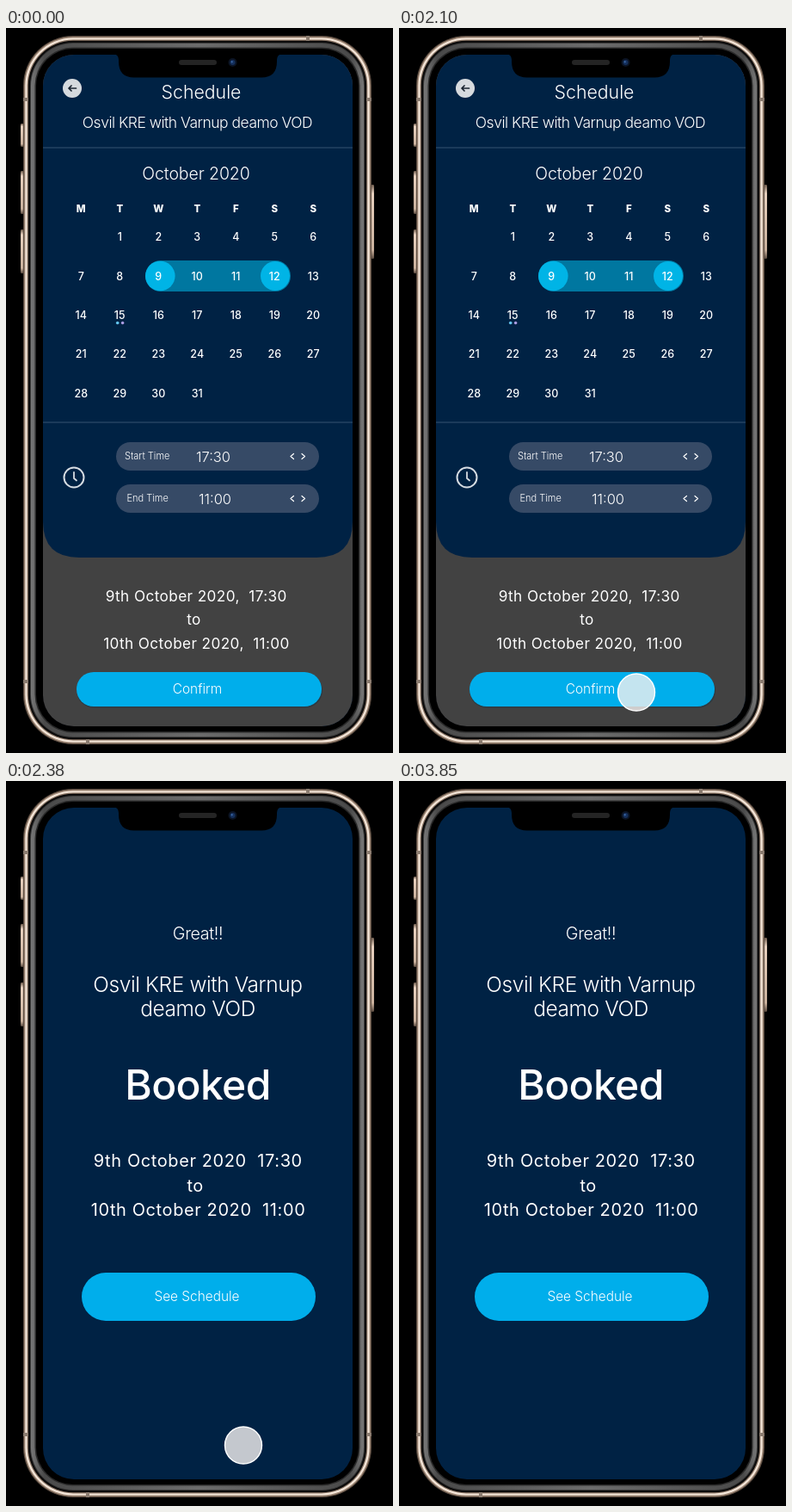
These frames come from a looping animation (450x842 px, 3990 ms). An HTML page:

```html
<!DOCTYPE html>
<html lang="en">
<head>
<meta charset="utf-8">
<title>Booking flow</title>
<style>
  html, body { margin: 0; width: 100%; height: 100%; overflow: hidden; background: #000; }
  svg { display: block; width: 100%; height: 100%; }
  text { font-family: Inter, "Liberation Sans", sans-serif; fill: #fff; white-space: pre; }
</style>
</head>
<body>
<svg id="stage" viewBox="0 0 450 842">
  <defs>
    <linearGradient id="steel">
      <stop offset="0" stop-color="#777"/>
      <stop offset=".04" stop-color="#4a4a4a"/>
      <stop offset=".5" stop-color="#6c6c6c"/>
      <stop offset=".96" stop-color="#4a4a4a"/>
      <stop offset="1" stop-color="#777"/>
    </linearGradient>
    <linearGradient id="key" x2="0" y2="1">
      <stop offset="0" stop-color="#6e5b4d"/>
      <stop offset=".12" stop-color="#e6cfbd"/>
      <stop offset=".88" stop-color="#c9b09c"/>
      <stop offset="1" stop-color="#57483d"/>
    </linearGradient>
    <clipPath id="glass"><rect x="43" y="31" width="360" height="780" rx="36"/></clipPath>
  </defs>
  <g id="body"></g>
  <g clip-path="url(#glass)">
    <g id="booked"></g>
    <rect id="dim" x="43" y="31" width="360" height="780" fill="#000018"/>
    <g id="schedule"></g>
  </g>
  <g id="notch"></g>
  <path id="arrow" d="M0 0V15L3.5 11.8 6 17.6 8.6 16.5 6.1 10.9H10.8Z" fill="#000" stroke="#fff" stroke-width="1.2"/>
  <circle id="touch" r="21.5" fill="rgb(246,242,241)" fill-opacity=".8" stroke="#fff" stroke-width="1.4"/>
</svg>
<script>
const $ = id => document.getElementById(id);
const NAVY = '#002244', BLUE = '#00aeeb';

const box = (x, y, w, h, r, fill) =>
  `<rect x="${x}" y="${y}" width="${w}" height="${h}" rx="${r}" fill="${fill}"/>`;
const disc = (x, y, r, fill) => `<circle cx="${x}" cy="${y}" r="${r}" fill="${fill}"/>`;
const line = (d, stroke, width) =>
  `<path d="${d}" fill="none" stroke="${stroke}" stroke-width="${width}" stroke-linecap="round" stroke-linejoin="round"/>`;
const label = (s, x, y, size, weight = 300, gap = 0, anchor = 'middle') =>
  `<text x="${x}" y="${y}" font-size="${size}" font-weight="${weight}" letter-spacing="${gap}" text-anchor="${anchor}">${s}</text>`;

function phoneBody() {
  const ring = (d, fill) => box(20 + d, 9 + d, 405 - 2 * d, 823 - 2 * d, 58 - d, fill);
  const keys = [[17, 111, 27], [17, 166, 50], [17, 234, 51], [424.5, 182, 86]]
    .map(([x, y, h]) => box(x, y, 3.5, h, 1.2, 'url(#key)')).join('');
  const rings = ring(0, '#594a3f') + ring(1.2, '#a48d7b') + ring(2.4, '#f5e7da') +
    ring(4.6, '#8d7868') + ring(5.8, '#0c0b0b') + ring(8, '#3a3a3a') +
    ring(9, 'url(#steel)') + ring(13.5, '#2a2a2a') + ring(15, '#000');
  const bands = [[20, 81, 6, 4], [419, 81, 6, 4], [20, 757, 6, 4], [419, 757, 6, 4],
    [349, 9, 4, 6], [93, 826, 4, 6]].map(b => box(...b, 0, '#8b7c70')).join('');
  return keys + rings + bands;
}

function notch() {
  return '<path d="M125 30Q131 31 131 37V39Q131 57.500 149 57.500H297Q315 57.500 315 39V37Q315 31 321 30Z"/>' +
    box(201, 37, 44, 6, 3, '#242424') +
    disc(263.5, 40, 5, '#0b1424') + disc(263.5, 40, 3, '#15305c') + disc(262.7, 39.3, 1.1, '#3f6ba8');
}

function calendar() {
  const col = i => 87.3 + 45 * i;
  let out = box(162, 270, 169, 36, 18, '#0077a0') + disc(179.3, 288, 17.3, '#00b4e6') + disc(313, 288, 17, '#00b4e6');
  [...'MTWTFSS'].forEach((d, i) => out += label(d, col(i), 213.5, 11.5, 800));
  for (let day = 1; day <= 31; day++) {
    out += label(day, col(day % 7), 247.3 + 45.3 * Math.floor(day / 7), 12.5, 500, .1);
  }
  return out + disc(129.7, 342.5, 1.8, '#62c4ee') + disc(135.6, 342.5, 1.8, '#a99be0');
}

function timeRow(y, name, nameX, time, timeX) {
  const m = y + 16.5;
  return box(128, y, 236, 33, 16.5, '#364a66') +
    label(name, nameX, m + 3.8, 11, 300, 0, 'start') +
    label(time, timeX, m + 6.6, 16.5, 300, 0, 'start') +
    line(`M334.500 ${m - 3}l-3.500 3 3.500 3M344 ${m - 3}l3.500 3-3.500 3`, '#fff', 1.2);
}

function scheduleScreen() {
  const rule = y => box(43, y, 360, 1, 0, '#365270');
  return box(43, 31, 360, 780, 18, '#424242') +
    `<path d="M43 31H403V573Q403 615 361 615H85Q43 615 43 573Z" fill="${NAVY}"/>` +
    disc(77, 70, 11, '#d6dade') + line('M81.500 70H73M76 67L73 70 76 73', '#1a2430', 1.7) +
    label('Schedule', 227, 81.5, 21.3) +
    label('Osvil KRE with Varnup deamo VOD', 222.5, 116.3, 17.5, 300, -.5) +
    rule(138.5) + label('October 2020', 221, 176.3, 19.5, 300, -.1) + calendar() + rule(457.5) +
    '<circle cx="79" cy="522" r="11.500" fill="none" stroke="#d6dce2" stroke-width="2"/>' +
    line('M79 516V523L82 525.500', '#d6dce2', 1.8) +
    timeRow(481, 'Start Time', 138, '17:30', 221) +
    timeRow(530, 'End Time', 140.5, '11:00', 224) +
    label('9th October 2020,  17:30', 221.3, 665.5, 17.2, 400, .4) +
    label('to', 218.5, 693, 17.2, 400, .4) +
    label('10th October 2020,  11:00', 221.5, 721, 17.2, 400, .4) +
    box(82, 749.5, 286, 40, 20, '#2d3a42') + box(82, 748, 285, 40, 20, BLUE) +
    label('Confirm', 222.5, 773.3, 15.4);
}

function bookedScreen() {
  return box(43, 31, 450, 780, 0, NAVY) +
    label('Great!!', 223, 184, 19.8, 300, -.4) +
    label('Osvil KRE with Varnup', 223, 245, 24.5, 300, -.4) +
    label('deamo VOD', 223, 273, 24.5, 300, -.4) +
    label('Booked', 223, 370, 48, 500, -.6) +
    label('9th October 2020  17:30', 223.3, 448, 20, 400, .6) +
    label('to', 220, 476.5, 20, 400, .4) +
    label('10th October 2020  11:00', 223.5, 505, 20, 400, .6) +
    box(88, 571, 272, 56, 28, BLUE) +
    label('See Schedule', 222, 603.8, 15.4);
}

$('body').innerHTML = phoneBody();
$('notch').innerHTML = notch();
$('schedule').innerHTML = scheduleScreen();
$('booked').innerHTML = bookedScreen();

const LOOP = 3990, STEP = 70;
const span = (t, a, b) => Math.min(1, Math.max(0, (t - a) / (b - a)));
const easeOut = p => 1 - (1 - p) ** 3;
const easeInOut = p => p < .5 ? 4 * p ** 3 : 1 - 4 * (1 - p) ** 3;
const mix = (a, b, p) => a + (b - a) * p;
const place = (id, x, y) => $(id).setAttribute('transform', `translate(${x} ${y})`);
const show = (id, on) => $(id).setAttribute('visibility', on ? 'visible' : 'hidden');

function draw(t) {
  // The front page slides away; the next one follows at a quarter of the distance.
  const slide = easeInOut(span(t, 2100, 2366));
  place('schedule', -360 * slide, 0);
  place('booked', 90 * (1 - slide), 0);
  $('dim').setAttribute('opacity', .45 * (1 - slide));
  show('schedule', slide < 1);

  const enter = easeOut(span(t, 70, 560));
  place('arrow', mix(296, 276.3, enter), mix(848, 762.5, enter));
  show('arrow', t >= 70 && t < 1890);

  const drift = span(t, 3010, 3150), leave = span(t, 3430, 3850) ** 2;
  place('touch', 276 + .5 * drift, mix(771.5 - 1.5 * drift, 866, leave));
  show('touch', t >= 1890 && t < 3850);
}

const start = performance.now();
function tick() {
  const t = (performance.now() - start) % LOOP;
  draw(Math.floor(t / STEP) * STEP);
  requestAnimationFrame(tick);
}
tick();
</script>
</body>
</html>
```
